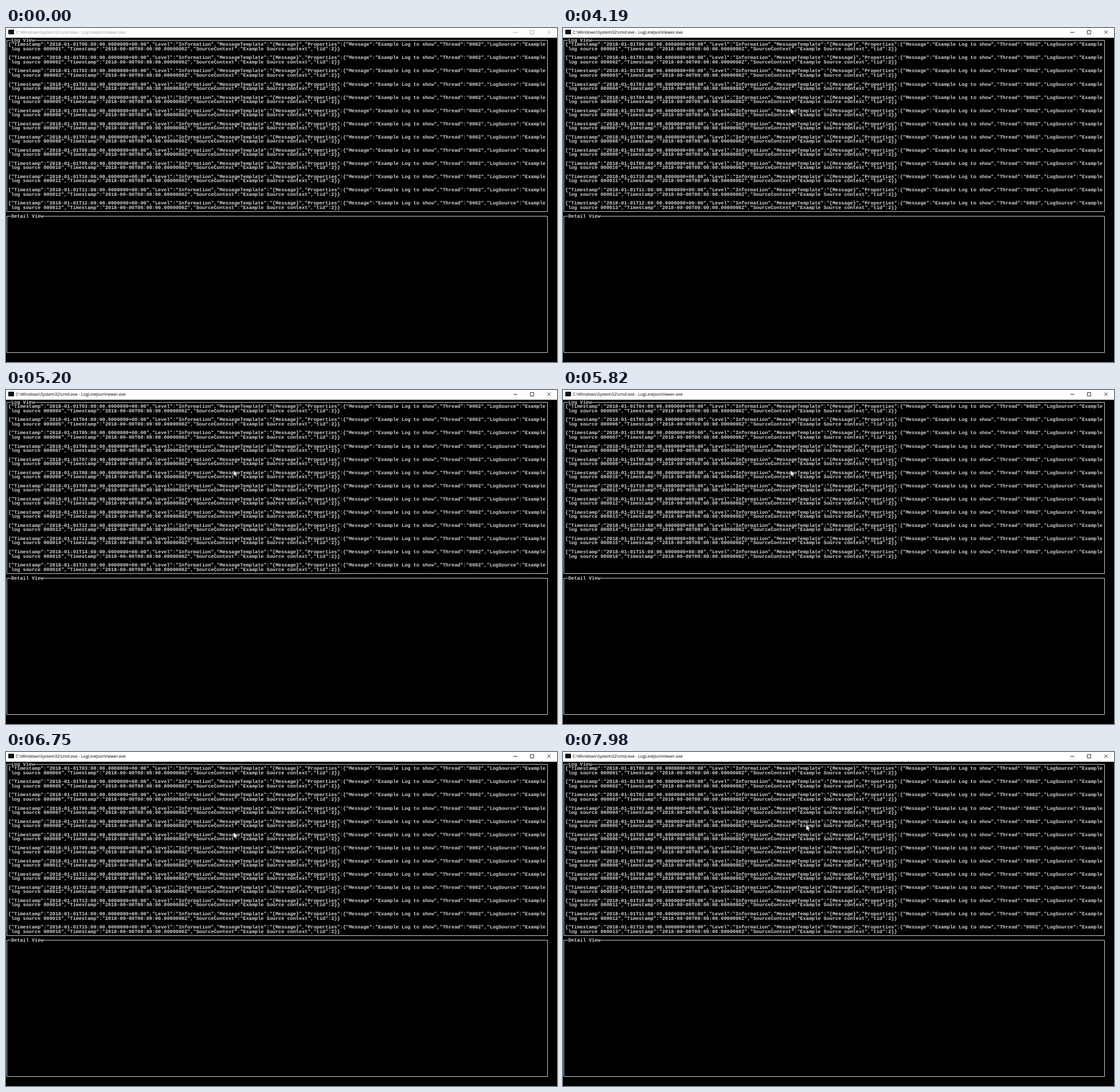
An HTML page that plays this animation: 961 px wide and 583 px high, repeating every 8 s.

```html
<!DOCTYPE html>
<html lang="en">
<head>
<meta charset="utf-8">
<title>Log viewer</title>
<style>
  html, body { margin: 0; width: 100%; height: 100%; overflow: hidden; background: #000; }
  svg { display: block; width: 961px; height: 583px; }
  text { white-space: pre; text-rendering: geometricPrecision; }
  #console text { font: bold 8.545px "Liberation Mono", monospace; fill: #d4d4d4; }
  #bar text { font: 7.37px "Open Sans", sans-serif; fill: currentColor; }
  #bar path { fill: none; stroke: currentColor; stroke-width: .8; }
  #frames { fill: none; stroke: #ccc; }
</style>
</head>
<body>
<svg viewBox="0 0 961 583">
  <rect width="961" height="583"/>
  <g id="bar">
    <rect width="961" height="17" fill="#fff"/>
    <rect x="4" y="3" width="10" height="8" fill="#111"/>
    <text x="17" y="10">C:\Windows\System32\cmd.exe - LogLineJsonViewer.exe</text>
    <path d="M885 7.5h7M914.5 4.5h6v6h-6zM944 4.3l6 6m0-6l-6 6"/>
  </g>
  <path id="frames" d="M8.5 21.5H1.5V320.5H944.5V21.5H50M8.5 328.5H1.5V566.5H944.5V328.5H65.5"/>
  <g id="console"></g>
  <path id="cursor" d="M0 0V10.2L2.4 8L4 11.6L5.7 10.9L4.1 7.4H7.3Z" fill="#fff" stroke="#000" stroke-width=".6"/>
</svg>
<script>
const LOOP = 8000, CELL_W = 5.128, CELL_H = 7.68, VISIBLE_ROWS = 38, ENTRIES = 16;
const byId = id => document.getElementById(id);

function addText(col, row, content = '') {
  const el = document.createElementNS('http://www.w3.org/2000/svg', 'text');
  el.setAttribute('x', -1.1 + col * CELL_W);
  el.setAttribute('y', 23.7 + row * CELL_H);
  el.textContent = content;
  byId('console').append(el);
  return el;
}

const pad = (n, length) => String(n).padStart(length, '0');

// Each entry wraps onto two rows and is followed by a blank one.
const log = Array.from({ length: ENTRIES }, (_, hour) => [
  `{"Timestamp":"2018-01-01T${pad(hour, 2)}:00:00.0000000+00:00","Level":"Information",` +
  '"MessageTemplate":"{Message}","Properties":{"Message":"Example Log to show",' +
  '"Thread":"0002","LogSource":"Example',
  ` log source ${pad(hour + 1, 6)}","Timestamp":"2018-00-00T00:00:00.0000000Z",` +
  '"SourceContext":"Example Source context","tid":2}}',
  ''
]).flat();

addText(2, 0, 'Log View');
addText(2, 40, 'Detail View');
const rows = Array.from({ length: VISIBLE_ROWS }, (_, i) => addText(1, i + 1));

// [time, first visible row]
const scrolls = [
  [0, 0], [4490, 1], [4570, 2], [4720, 3],
  [4890, 4], [4970, 5], [5040, 7], [5120, 8], [5200, 9],
  [5670, 10], [5740, 11], [5820, 12], [5900, 13], [5980, 14], [6050, 15],
  [6590, 13], [6670, 11], [6750, 9], [6860, 7], [6920, 6],
  [7210, 4], [7290, 2], [7380, 1], [7460, 0]
];

const linear = p => p;
const smooth = p => p * p * (3 - 2 * p);
const START = [961, 646];
const moves = [
  { from: 500, to: 660, steps: 3, end: [691, 439], ease: linear },
  { from: 960, to: 1600, steps: 9, end: [386, 118], ease: smooth },
  { from: 2530, to: 2530, steps: 1, end: [387, 118], ease: linear },
  { from: 2700, to: 2700, steps: 1, end: [387, 119], ease: linear },
  { from: 2850, to: 3240, steps: 6, end: [396, 140], ease: smooth },
  { from: 3640, to: 3640, steps: 1, end: [397, 140], ease: linear },
  { from: 7690, to: 7980, steps: 5, end: [424, 127], ease: smooth }
];

function cursorAt(t) {
  let pos = START;
  for (const { from, to, steps, end, ease } of moves) {
    if (t < from) break;
    const interval = (to - from) / (steps - 1) || 1;
    const step = Math.min(steps, Math.floor((t - from) / interval + 1e-6) + 1);
    const p = ease(step / steps);
    pos = pos.map((v, i) => Math.round(v + (end[i] - v) * p));
  }
  return pos;
}

let shownTop = -1;
function render(t) {
  const top = scrolls.findLast(([time]) => time <= t)[1];
  if (top !== shownTop) {
    rows.forEach((el, i) => { el.textContent = log[top + i] ?? ''; });
    shownTop = top;
  }
  byId('bar').style.color = t < 3880 ? '#999' : '#000';
  byId('cursor').setAttribute('transform', `translate(${cursorAt(t)})`);
}

const startTime = performance.now();
function tick() {
  render((performance.now() - startTime) % LOOP);
  requestAnimationFrame(tick);
}
tick();
</script>
</body>
</html>
```
